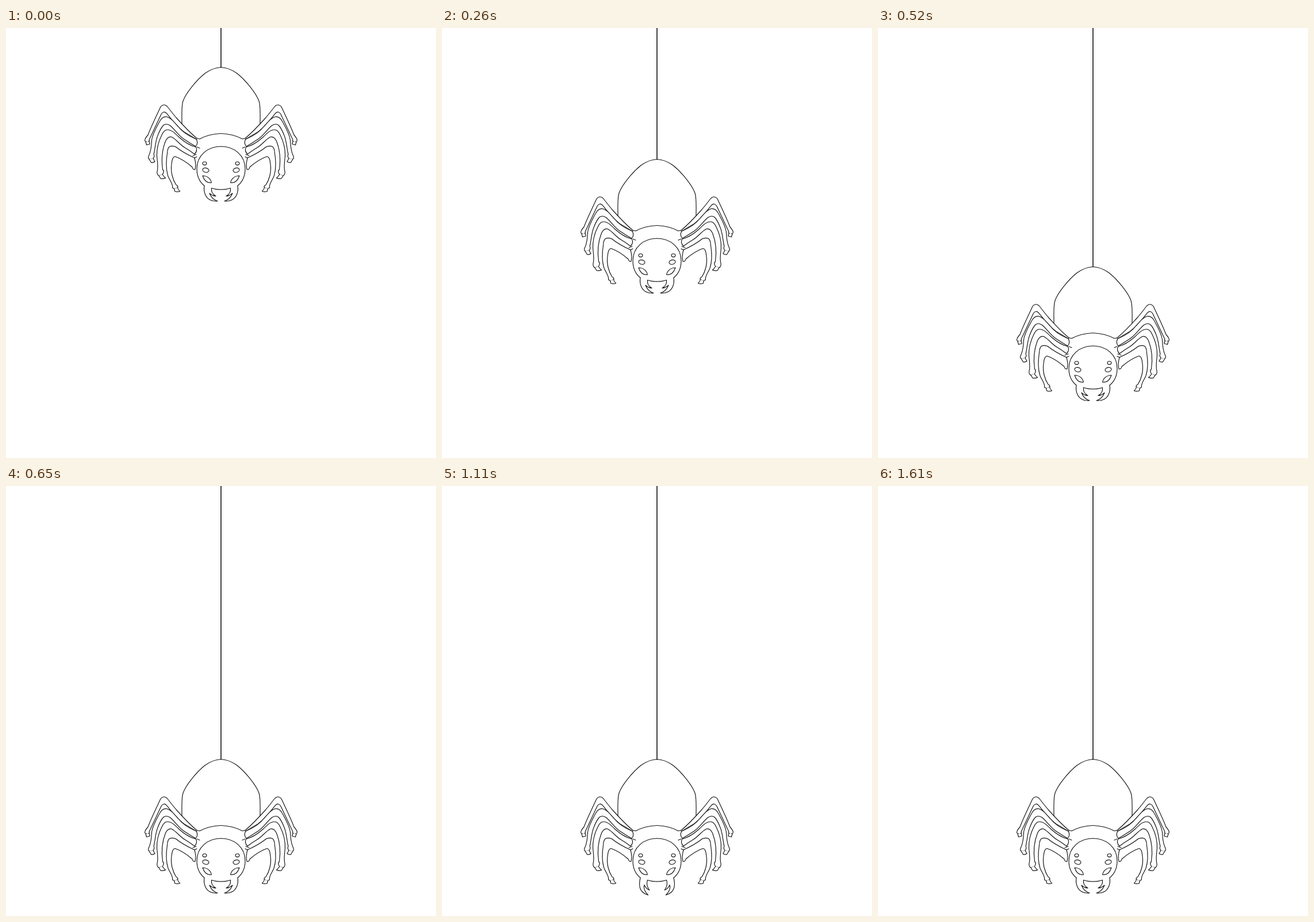
An HTML page for the animation above (1710 ms loop, 748x748 px).

```html
<!DOCTYPE html>
<html lang="en">
<head>
<meta charset="utf-8">
<title>Spider</title>
<style>
  html, body { margin: 0; height: 100%; overflow: hidden; background: #fff; }
  svg { display: block; width: 100vw; height: 100vh; }
  path, ellipse { fill: none; stroke: #111; stroke-width: 1.15; stroke-linejoin: round; stroke-linecap: round; }
  #thread { stroke-width: 1.6; }
  .leg path { fill: #fff; }
</style>
</head>
<body>
<svg viewBox="0 0 748 748">
  <path id="thread"/>
  <g id="spider">
    <g id="half">
      <!-- abdomen and thorax -->
      <path d="M374 68.500C364 68.500 356 72 346 79C332 90 313 113 308 127C305 136 306 150 306 167"/>
      <path d="M374 183.500C361 184 348 187 337 193L332 192"/>
      <!-- legs, back to front -->
      <g class="leg">
        <path d="M332 192C320 182 306 167 297 157C290 149 285 142 280 136Q274 131 269 137C264 148 254 168 247 186Q240 194 242 197L246 198Q251 197 249 194.500C254 184 263 165 270 150Q274 143.500 279 148C287 158 298 172 310 181Q322 188 332 194"/>
        <path d="M243 198L244.500 203.500L250 202Q250 198 248 197"/>
        <path d="M331 193.500C317 188 307 181 299 171C291 162 286 156 280 154.500Q272 153 267 163C261 174 255 184 253.500 195C253 207 252 215 248.500 222Q246 227 250 228.500L256 227Q259 223 257 220C260 207 260 196 264 187Q269 174 274 169Q279 165 286 170C295 178 300 187 309 193Q321 201 330 206Q335 200 331 193.500"/>
        <path d="M249 228L252.500 234Q256 234.500 259 232.500L256 227"/>
        <path d="M330 207C318 204 310 198 301 190C294 183 288 177 281 177Q275 177 271 186C265 198 262 211 262.500 223C264 237 265 243 263 249Q262 255 266 257L272 255Q276 250 272.500 246C270 228 272 211 277 198Q281 188 288 189.500C297 194 301 202 311 208Q321 214 328 219.500Q334 213 330 207"/>
        <path d="M266 257L269 262Q274 262.500 277.500 261Q274 258 272 254.500"/>
        <path d="M328 226C315 220 303 213 295 206.500Q289 204.500 285 206Q281 208 280.500 218C278 234 278 246 282 258C286 267 291 272 289.500 278L294 280L299 277Q299 274 296 273C290 264 286 250 288 237Q289 224 294 223.500C304 227 315 234 324 242Q325 247 329 246Q331 237 328 226"/>
        <path d="M292.500 280L294 284.500Q299 285.500 302.500 284Q299 281 298.500 277.500"/>
      </g>
      <path d="M325 222L331 220M328 226L332 224M332 207L337 209"/>
      <!-- head -->
      <path d="M374 206C350.500 206 332 222 332 245C332 258 337 268 345 274.500M357.500 278.500Q364 281 374 281"/>
      <ellipse cx="345.500" cy="235.500" rx="3.400" ry="2.800"/>
      <ellipse cx="347.500" cy="247.300" rx="5.500" ry="3.800" transform="rotate(12 347.500 247.300)"/>
      <path d="M342 257C350 257 356 262 357.500 269C350 270 345 266 342 257Z"/>
      <path id="closed" d="M345 274.500C343 286 348 295 354 298.500Q360 302 368 301C361 299 357 295 354 287.500Q359 292 365 292.500C358 288 357 284 357.500 278.500"/>
      <path id="open" d="M345 274.500C342 287 344 295 349 299.500Q353 303 358.500 304.500C352 298 350 293 352 287Q355 294 361 296C357 291 355 286 357.500 278.500"/>
    </g>
    <use href="#half" transform="matrix(-1 0 0 1 748 0)"/>
  </g>
</svg>
<script>
const get = id => document.getElementById(id);
const drops = [0, 72, 160, 262, 347, 407];
const STEP = 130, CHOMP_START = 910, CHOMP = 100, LOOP = 1710;

function draw(now) {
  const t = now % LOOP;
  const y = drops[Math.min(Math.floor(t / STEP), drops.length - 1)];
  const open = t >= CHOMP_START && Math.floor((t - CHOMP_START) / CHOMP) % 2 === 0;
  get('spider').setAttribute('transform', `translate(0 ${y})`);
  get('thread').setAttribute('d', `M374 0V${y + 68.5}`);
  get('open').style.display = open ? 'inline' : 'none';
  get('closed').style.display = open ? 'none' : 'inline';
}

const start = performance.now();
function tick() {
  draw(performance.now() - start);
  requestAnimationFrame(tick);
}
tick();
</script>
</body>
</html>
```
